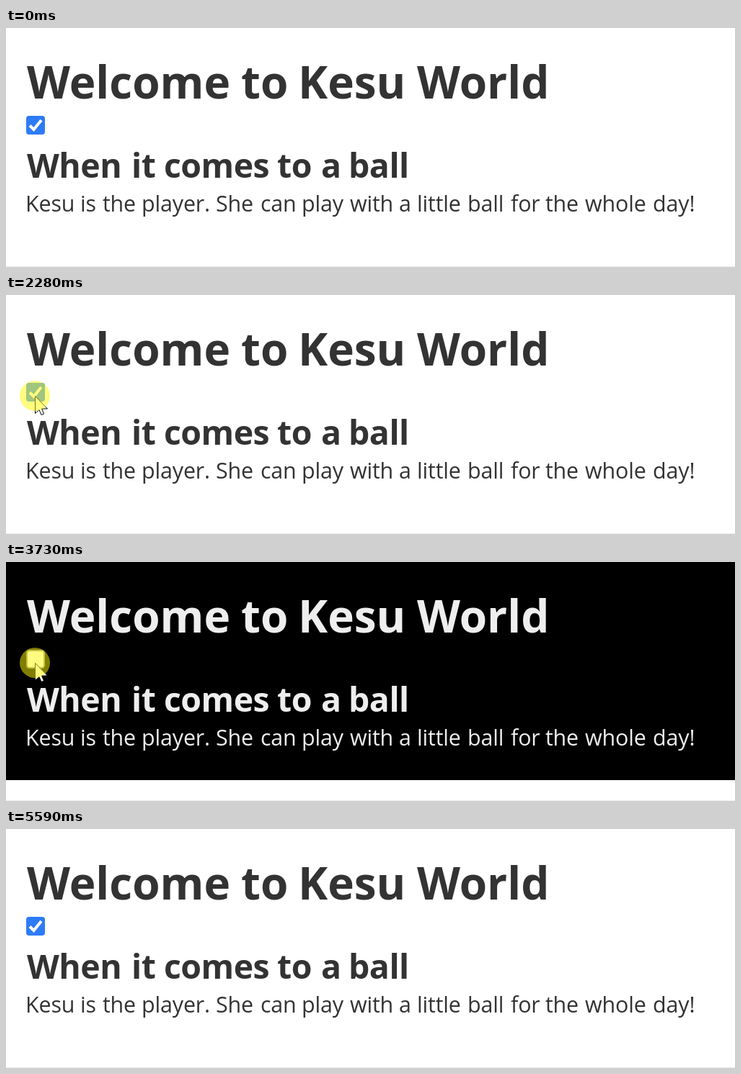
Recreate the animation shown at these times as an HTML page. Size 1011 by 332 pixels, loop 6380 ms.

```html
<!DOCTYPE html>
<html lang="en">
<head>
<meta charset="utf-8">
<title>Theme checkbox</title>
<style>
  html, body { margin: 0; width: 100%; height: 100%; overflow: hidden; background: #fff; }
  svg { display: block; width: 1011px; height: 332px; font-family: "Open Sans", "Noto Sans", sans-serif; }
  svg, svg * { animation: 6380ms step-end infinite; }

  .theme { color: #333; animation-name: text-color; }
  .theme text { fill: currentColor; }
  .title { font-size: 62px; font-weight: 700; }
  .subtitle { font-size: 46.4px; font-weight: 700; letter-spacing: -.5px; }
  .body { font-size: 30.4px; letter-spacing: -.15px; }
  .panel { visibility: hidden; animation-name: dark; }
  .box { fill: #2d7bf7; animation-name: box; }
  .empty { visibility: hidden; fill: #fff; stroke-width: 2; animation-name: dark, border; }
  .tick { fill: none; stroke: #fff; stroke-width: 4; animation-name: light; }
  .cursor { visibility: hidden; animation-name: present, move; }
  .click { visibility: hidden; fill: #fffa00; fill-opacity: .5; animation-name: click; }

  @keyframes text-color {
    0% { color: #333 }
    36.67% { color: #eee }
    60.5%, 100% { color: #333 }
  }
  @keyframes dark {
    0% { visibility: hidden }
    36.67% { visibility: visible }
    60.5%, 100% { visibility: hidden }
  }
  @keyframes light {
    0% { visibility: visible }
    36.67% { visibility: hidden }
    60.5%, 100% { visibility: visible }
  }
  @keyframes box {
    0% { fill: #2d7bf7 }
    21.94% { fill: #1f5fc4 }
    35.73% { fill: #3f91ff }
    36.67% { fill: #000 }
    60.5% { fill: #1f5fc4 }
    84.32%, 100% { fill: #2d7bf7 }
  }
  @keyframes border {
    0% { stroke: #4f4f4f }
    58.46% { stroke: #8d8d8d }
    60.5%, 100% { stroke: #4f4f4f }
  }
  @keyframes present {
    0% { visibility: hidden }
    11.12% { visibility: visible }
    87.61%, 100% { visibility: hidden }
  }
  @keyframes click {
    0% { visibility: hidden }
    35.73% { visibility: visible }
    36.67% { visibility: hidden }
    58.46% { visibility: visible }
    60.5%, 100% { visibility: hidden }
  }
  @keyframes move {
    0% { transform: translate(81px, 325px) }
    11.12% { transform: translate(81px, 325px); animation-timing-function: steps(3) }
    14.36% { transform: translate(69px, 240px); animation-timing-function: steps(3) }
    17.6% { transform: translate(54px, 178px); animation-timing-function: steps(3) }
    20.84% { transform: translate(44px, 148px) }
    21.94% { transform: translate(42px, 143px) }
    23.19% { transform: translate(40px, 140px) }
    84.32% { transform: translate(53px, 165px) }
    85.42% { transform: translate(76px, 212px) }
    86.52%, 100% { transform: translate(109px, 276px) }
  }
</style>
</head>
<body>
<svg viewBox="0 0 1011 332">
  <rect y="331" width="1011" height="1" fill="#ebebeb"/>
  <rect class="panel" width="1011" height="303"/>

  <g class="theme">
    <text class="title" y="98"><tspan x="29">Welcome</tspan> <tspan x="326">to</tspan> <tspan x="405">Kesu</tspan> <tspan x="570">World</tspan></text>
    <text class="subtitle" y="208"><tspan x="29">When</tspan> <tspan x="174">it</tspan> <tspan x="219">comes</tspan> <tspan x="376">to</tspan> <tspan x="437">a</tspan> <tspan x="475">ball</tspan></text>
    <text class="body" y="255"><tspan x="27">Kesu</tspan> <tspan x="103">is</tspan> <tspan x="134">the</tspan> <tspan x="188">player.</tspan> <tspan x="291">She</tspan> <tspan x="353">can</tspan> <tspan x="410">play</tspan> <tspan x="477">with</tspan> <tspan x="545">a</tspan> <tspan x="570">little</tspan> <tspan x="640">ball</tspan> <tspan x="700">for</tspan> <tspan x="748">the</tspan> <tspan x="803">whole</tspan> <tspan x="897">day!</tspan></text>
  </g>

  <rect class="box" x="28" y="122" width="26" height="26" rx="4"/>
  <path class="tick" d="M33 135.5 38.5 141 49 128"/>
  <rect class="empty" x="29" y="123" width="24" height="24" rx="3.5"/>

  <path class="cursor" d="M.5 .5V24.5L6 19.5 9 26.5 12.5 25 9.5 18H17.5Z" fill="#fff" stroke="#000"/>
  <circle class="click" cx="40" cy="140" r="21"/>
</svg>
</body>
</html>
```
